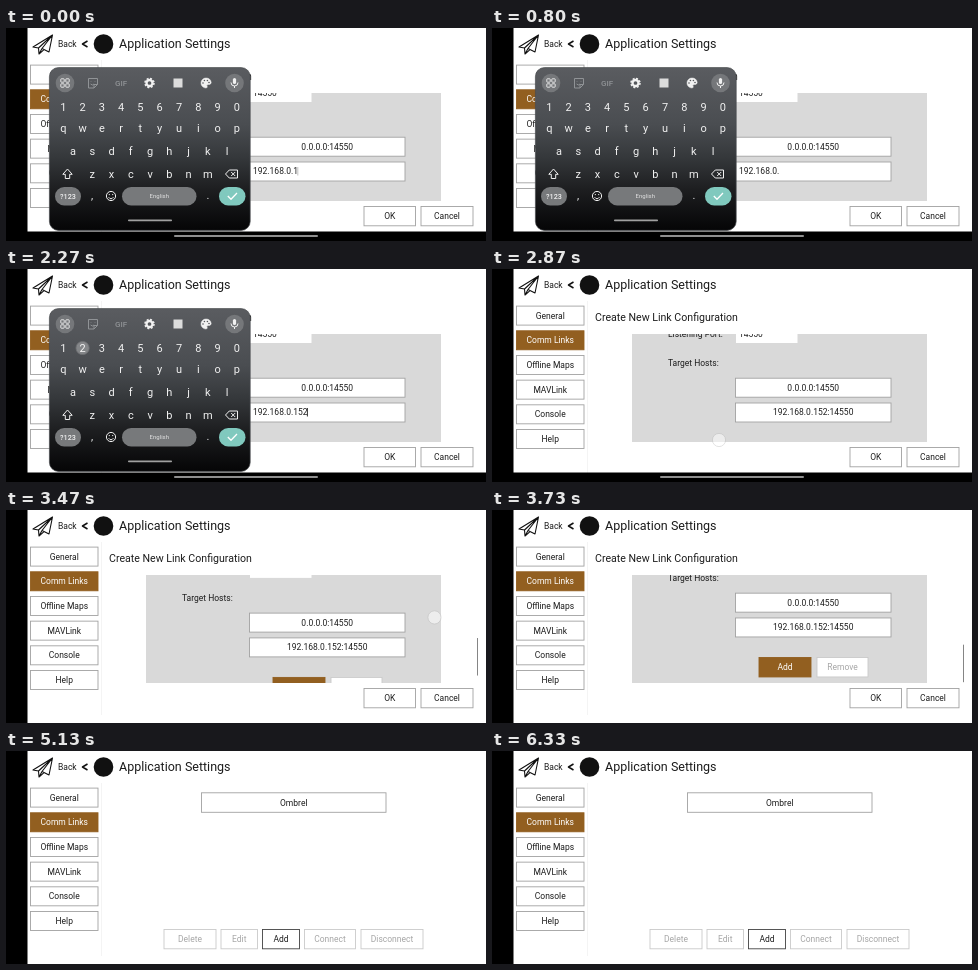
Recreate the animation shown at these times as an HTML page. Size 480 px wide and 213 px high, loop 6390 ms.

```html
<!DOCTYPE html>
<html lang="en">
<head>
<meta charset="utf-8">
<title>Link settings</title>
<style>
  html, body { margin: 0; width: 100%; height: 100%; overflow: hidden; background: #fff; }
  svg { display: block; width: 100vw; height: 100vh; }
  text { font-family: Roboto, "Open Sans", sans-serif; white-space: pre; }
</style>
</head>
<body>
<svg id="stage" viewBox="0 0 480 213">
  <defs>
    <linearGradient id="board" x1="0" y1="0" x2="0" y2="1">
      <stop offset="0" stop-color="#5a5c60"/>
      <stop offset=".35" stop-color="#4a4d51"/>
      <stop offset=".55" stop-color="#35383b"/>
      <stop offset=".75" stop-color="#1d1e20"/>
      <stop offset="1" stop-color="#050506"/>
    </linearGradient>
    <clipPath id="panelClip"><rect x="140" y="65" width="295" height="108"/></clipPath>
  </defs>
</svg>
<script>
const LOOP = 6390;
const BROWN = '#925f20';
const stage = document.getElementById('stage');

function el(parent, tag, attrs = {}, content) {
  const node = document.createElementNS('http://www.w3.org/2000/svg', tag);
  for (const key in attrs) node.setAttribute(key, attrs[key]);
  if (content !== undefined) node.textContent = content;
  parent.appendChild(node);
  return node;
}
const set = (node, attrs) => { for (const key in attrs) node.setAttribute(key, attrs[key]); };
const show = (node, on) => node.setAttribute('visibility', on ? 'visible' : 'hidden');
const group = (parent, attrs) => el(parent, 'g', attrs);
const rect = (parent, x, y, width, height, fill, more) =>
  el(parent, 'rect', { x, y, width, height, fill, ...more });
const circle = (parent, cx, cy, r, fill, more) =>
  el(parent, 'circle', { cx, cy, r, fill, ...more });
const line = (parent, d, stroke, width = 1, more) =>
  el(parent, 'path', { d, stroke, 'stroke-width': width, fill: 'none', 'stroke-linejoin': 'round', ...more });

// Text whose capitals are centred on y.
function label(parent, content, x, y, size = 8.5, fill = '#1c1c1c', anchor = 'start', more) {
  return el(parent, 'text',
    { x, y: y + size * 0.355, 'font-size': size, fill, 'text-anchor': anchor, ...more }, content);
}

const STYLES = {
  normal: ['#fff', '#a2a2a2', '#1c1c1c'],
  disabled: ['#fff', '#cacaca', '#a6a6a6'],
  focused: ['#fff', '#444', '#1c1c1c'],
  active: [BROWN, BROWN, '#fff']
};
function button(parent, content, x, y, w, h, style = 'normal') {
  const box = rect(parent, x + 0.5, y + 0.5, w - 1, h - 1, '#fff', { 'stroke-width': 0.9 });
  const text = label(parent, content, x + w / 2, y + h / 2, 8.5, '#1c1c1c', 'middle');
  const paint = name => {
    const [fill, stroke, ink] = STYLES[name];
    set(box, { fill, stroke });
    set(text, { fill: ink });
  };
  paint(style);
  return paint;
}

// Header and sidebar
rect(stage, 0, 0, 480, 213, '#fff');
rect(stage, 0, 0, 21.5, 213, '#000');
line(stage, 'M27 19 46.5 7 43 24 36 20.5 46.5 7 32.5 20ZM32.5 20 33 26 36 20.5M33 26 38 21.7', '#111', 1.1);
label(stage, 'Back', 52, 16);
line(stage, 'M81.5 13 76.5 16 81.5 19', '#111', 1.5);
circle(stage, 97.5, 16, 9.8, '#111');
label(stage, 'Application Settings', 113, 16, 12.5);
rect(stage, 95, 32, 1, 173, '#f4f4f4');
['General', 'Comm Links', 'Offline Maps', 'MAVLink', 'Console', 'Help'].forEach((name, i) =>
  button(stage, name, 24, 36.6 + i * 24.68, 68.5, 20, i === 1 ? 'active' : 'normal'));

// Link form
const form = group(stage);
label(form, 'Create New Link Configuration', 103, 48, 10.6);
rect(form, 140, 65, 295, 108, '#d9d9d9');
const rows = group(group(form, { 'clip-path': 'url(#panelClip)' }));
label(rows, 'Listening Port:', 176, 64.5);
rect(rows, 244, 54, 61.5, 20, '#fff');
label(rows, '14550', 247, 64.5);
label(rows, 'Target Hosts:', 176, 94);
button(rows, '0.0.0.0:14550', 243, 108.7, 156.5, 20);
button(rows, '', 243, 133.5, 156.5, 20);
const host = label(rows, '', 247, 143.4);
const caret = rect(rows, 291, 139, 0.9, 8.5, '#1c1c1c');
const paintAdd = button(rows, 'Add', 266.5, 173, 53, 20.5);
button(rows, 'Remove', 324.5, 173, 52, 20.5, 'disabled');
const paintOk = button(form, 'OK', 357.5, 178, 52.5, 20.3);
button(form, 'Cancel', 414.5, 178, 53, 20.3);
const scrollbar = rect(form, 471, 126, 1, 37.5, '#858585');

// Link list
const list = group(stage);
button(list, 'Ombrel', 195, 41.3, 185.5, 20.5);
[['Delete', 157.5, 53], ['Edit', 214.5, 37.5], ['Add', 256, 38], ['Connect', 298, 52], ['Disconnect', 354.5, 63]]
  .forEach(([name, x, w]) =>
    button(list, name, x, 178, w, 20.3, name === 'Add' ? 'focused' : 'disabled'));

// System navigation bar
const nav = group(stage);
rect(nav, 0, 203.5, 480, 10, '#000');
rect(nav, 168, 207.1, 144, 1.8, '#8f8f8f', { rx: 0.9 });

// Floating keyboard
const keyboard = group(stage);
rect(keyboard, 43.4, 39.6, 200.8, 162.8, 'url(#board)', { rx: 9, stroke: '#4a4c4f', 'stroke-width': 0.7 });
const INK = '#f1f1f1', DIM = '#909396';
const keyX = i => 57.3 + i * 19.28;

for (const x of [59, 228.5]) circle(keyboard, x, 55, 9.3, '#75777a');
for (const dx of [-4.2, 0.8]) for (const dy of [-4.2, 0.8])
  rect(keyboard, 59 + dx, 55 + dy, 3.4, 3.4, 'none', { stroke: INK, 'stroke-width': 0.9, rx: 0.6 });
line(keyboard, 'M82.5 50.5H91.5V56.5L88 60H82.5ZM91.5 56.5H88V60M85 53.5V54M89 53.5V54M84.6 56Q86.5 58 88 56', DIM);
label(keyboard, 'GIF', 115, 55, 8, DIM, 'middle', { 'font-weight': 500 });
circle(keyboard, 143.5, 55, 3, 'none', { stroke: INK, 'stroke-width': 2.3 });
circle(keyboard, 143.5, 55, 4.5, 'none', { stroke: INK, 'stroke-width': 1.5, 'stroke-dasharray': '2 1.534' });
rect(keyboard, 167.5, 50.5, 9, 9, '#dcdcdc');
line(keyboard, 'M200 50A5 5 0 1 0 200 60Q202 59.6 201 58T202.5 56.5H203.5Q205.2 56 205.2 54.5Q204.5 50 200 50Z', INK, 0.5, { fill: INK });
[[197, 55], [198.4, 52.5], [201.4, 52.5], [203, 54.5]].forEach(([x, y]) => circle(keyboard, x, y, 0.8, '#56585c'));
rect(keyboard, 226.9, 50, 3.2, 6, INK, { rx: 1.6 });
line(keyboard, 'M225 54.5A3.5 3.5 0 0 0 232 54.5M228.5 58V60', INK);

[['1234567890', 0, 79], ['qwertyuiop', 0, 100], ['asdfghjkl', 0.5, 122.7], ['zxcvbnm', 1.5, 145.7]]
  .forEach(([chars, shift, y]) => [...chars].forEach((c, i) =>
    label(keyboard, c, keyX(i + shift), y, 11, INK, 'middle')));

line(keyboard, 'M61.5 141 56.8 146.3H59.3V150.5H63.7V146.3H66.2Z', INK);
line(keyboard, 'M223.3 142H231.5V150H223.3L219.5 146ZM225.2 144 229.2 148M229.2 144 225.2 148', INK);
rect(keyboard, 49, 159, 26, 18.5, '#77797b', { rx: 9.2 });
label(keyboard, '?123', 62, 168, 7.2, INK, 'middle', { 'font-weight': 500 });
label(keyboard, ',', 86, 167, 11, INK, 'middle');
circle(keyboard, 105, 168, 4.6, 'none', { stroke: INK, 'stroke-width': 1 });
line(keyboard, 'M103.3 166V167.1M106.7 166V167.1M102.6 169.2Q105 172.4 107.4 169.2', INK);
rect(keyboard, 116, 159, 74.5, 18.5, '#77797b', { rx: 9.2 });
label(keyboard, 'English', 153.3, 168, 6, '#e2e2e2', 'middle');
label(keyboard, '.', 202, 167, 11, INK, 'middle');
rect(keyboard, 213, 159, 26.5, 18.5, '#80c9be', { rx: 9.2 });
line(keyboard, 'M221.8 168 225 171.2 231 165', '#fff', 1.3);
rect(keyboard, 122, 191.5, 44, 1.7, '#a0a0a0', { rx: 0.8 });

const finger = circle(stage, 0, 0, 6.6, '#fff', { stroke: '#b9b9b9', 'stroke-width': 0.8 });

// Interpolates between [time, value] stops.
function track(stops, t) {
  if (t <= stops[0][0]) return stops[0][1];
  for (let i = 1; i < stops.length; i++) {
    const [t0, a] = stops[i - 1], [t1, b] = stops[i];
    if (t < t1) return a + (b - a) * (t - t0) / (t1 - t0);
  }
  return stops[stops.length - 1][1];
}
// Latest value whose start time has passed.
const latest = (steps, t) => steps.reduce((value, [at, next]) => t >= at ? next : value, steps[0][1]);
const within = (t, from, to) => t >= from && t < to;

const TYPED = [[0, '1'], [200, ''], [1000, '1'], [1600, '15'], [2200, '152']];
const CARET = [[0, 0.3], [70, 0], [200, 1], [670, 0], [1000, 1], [1330, 0],
  [1600, 1], [2000, 0], [2200, 1], [2600, 0]];
const SCROLL = [[3270, 0], [3400, 2], [3470, 6], [3600, 18], [3730, 26], [3800, 29], [3870, 30]];
// from, to, x, y, opacity
const TOUCHES = [
  [70, 270, 225.5, 146, 0.3], [930, 1070, keyX(0), 79, 0.3], [1470, 1670, keyX(4), 79, 0.3],
  [2130, 2370, keyX(1), 79, 0.3], [2400, 3000, 227, 171, 0.5], [3270, 3730, 428.5, 113.5, 0.55],
  [4600, 4870, 382.5, 191, 0.7]
];

function draw(t) {
  const editing = t < 2600, onForm = t < 4930;
  const scroll = track(SCROLL, t);
  show(form, onForm);
  show(list, !onForm);

  const typed = latest(TYPED, t);
  host.textContent = '192.168.0.' + typed + (editing ? '' : ':14550');
  set(host, { x: editing ? 247 : 321.2, 'text-anchor': editing ? 'start' : 'middle' });
  caret.setAttribute('x', 286.6 + typed.length * 4.77);
  caret.setAttribute('opacity', latest(CARET, t));

  rows.setAttribute('transform', `translate(0 ${-scroll})`);
  scrollbar.setAttribute('y', 126 + scroll / 3);
  scrollbar.setAttribute('opacity', scroll > 0 ? 1 : 0);
  paintAdd(t < 4200 ? 'active' : 'normal');
  paintOk(within(t, 4600, 4870) ? 'active' : 'normal');

  nav.setAttribute('transform', `translate(0 ${track([[3000, 0], [3130, 10]], t)})`);
  keyboard.setAttribute('opacity', track([[2600, 1], [2730, 0]], t));

  const touch = TOUCHES.find(([from, to]) => within(t, from, to));
  show(finger, !!touch);
  if (touch) {
    const [, to, cx, y, alpha] = touch;
    const cy = y - scroll * (to === 3730);
    set(finger, { cx, cy, opacity: track([[to - 70, alpha], [to, 0]], t) });
  }
}

const start = performance.now();
function tick() {
  draw((performance.now() - start) % LOOP);
  requestAnimationFrame(tick);
}
draw(0);
requestAnimationFrame(tick);
</script>
</body>
</html>
```
